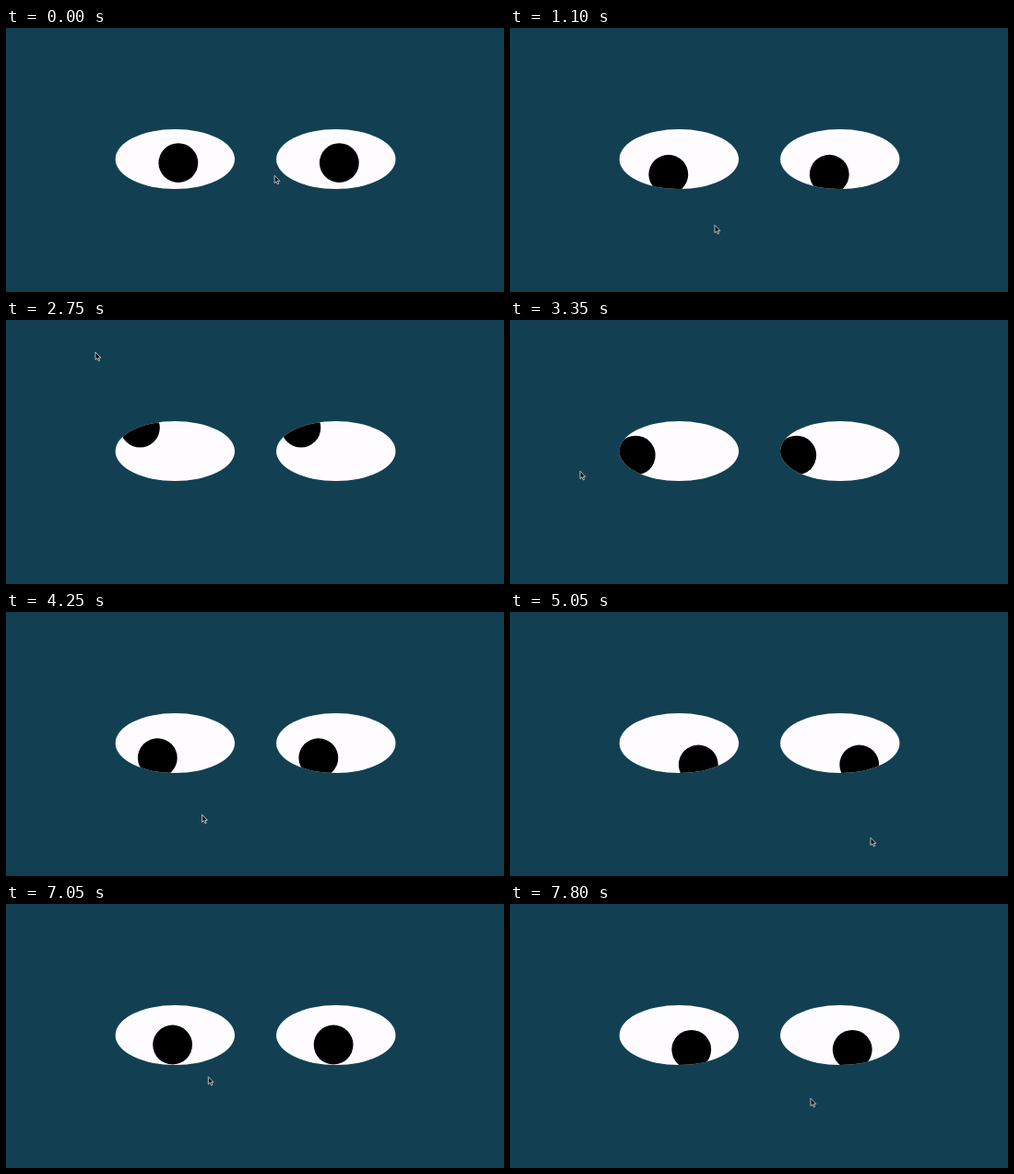
These frames come from a looping animation (540x287 px, 8000 ms). An HTML page:

```html
<!DOCTYPE html>
<html lang="en">
<head>
<meta charset="utf-8">
<title>Watching eyes</title>
<style>
  html, body { margin: 0; width: 100%; height: 100%; overflow: hidden; background: #124052; }
  svg { display: block; width: 100vw; height: 100vh; }
</style>
</head>
<body>
<svg viewBox="0 0 540 287">
  <defs>
    <clipPath id="lid"><ellipse rx="64.75" ry="32.5"/></clipPath>
    <g id="eye" clip-path="url(#lid)">
      <rect x="-65" y="-33" width="130" height="66" fill="#fefcff"/>
      <circle id="pupil" r="21.4"/>
    </g>
  </defs>
  <use href="#eye" x="183.3" y="142.6"/>
  <use href="#eye" x="357.8" y="142.6"/>
  <path id="cursor" d="M0 .3V8.5L1.9 6.8 3.3 9.8 4.6 9.2 3.3 6.3H5.8Z"
        fill="#050505" stroke="#e4e6ea" stroke-width=".8"/>
</svg>
<script>
const W = 540, H = 287, LOOP = 8000, STEP = 50, LAG = 40;
const START = [280, 159];

// Mouse sweeps: begin and end time, then two control points and the resting point
const sweeps = [
  { begin: -100, end: 650,  curve: [[390, 165], [-75, 215], [222, 215]] },
  { begin: 1050, end: 1750, curve: [[222, 190], [260, 160], [271, 136]] },
  { begin: 2200, end: 3050, curve: [[220, 2], [70, 2], [64, 81]] },
  { begin: 3050, end: 3350, curve: [[59, 105], [59, 145], [76, 164]] },
  { begin: 3900, end: 4450, curve: [[140, 190], [200, 225], [275, 233]] },
  { begin: 4850, end: 5650, curve: [[610, 305], [425, 40], [460, 108]] },
  { begin: 5950, end: 6750, curve: [[490, 15], [185, 50], [291, 188]] },
  { begin: 6950, end: 7250, curve: [[167, 187], [167, 187], [167, 188]] },
  { begin: 7450, end: 7750, curve: [[215, 190], [280, 208], [326, 211]] }
];

const ease = u => Math.sin(u * Math.PI / 2) ** 2;

function bezier(a, b, c, d, u) {
  const v = 1 - u;
  return v * v * v * a + 3 * v * v * u * b + 3 * v * u * u * c + u * u * u * d;
}

function pointer(t) {
  let from = START;
  for (const { begin, end, curve: [c1, c2, to] } of sweeps) {
    if (t <= begin) break;
    if (t < end) {
      const u = ease((t - begin) / (end - begin));
      return [0, 1].map(k => bezier(from[k], c1[k], c2[k], to[k], u));
    }
    from = to;
  }
  return from;
}

const cursor = document.getElementById("cursor");
const pupil = document.getElementById("pupil");

function draw() {
  const t = Math.floor(performance.now() % LOOP / STEP) * STEP;
  const [x, y] = pointer(t);
  cursor.setAttribute("transform", `translate(${x} ${y})`);

  const [lookX, lookY] = pointer(t - LAG);
  pupil.setAttribute("cx", (lookX / W - 0.5) * 129.5);
  pupil.setAttribute("cy", (lookY / H - 0.5) * 65 + 0.4);
  requestAnimationFrame(draw);
}
draw();
</script>
</body>
</html>
```
